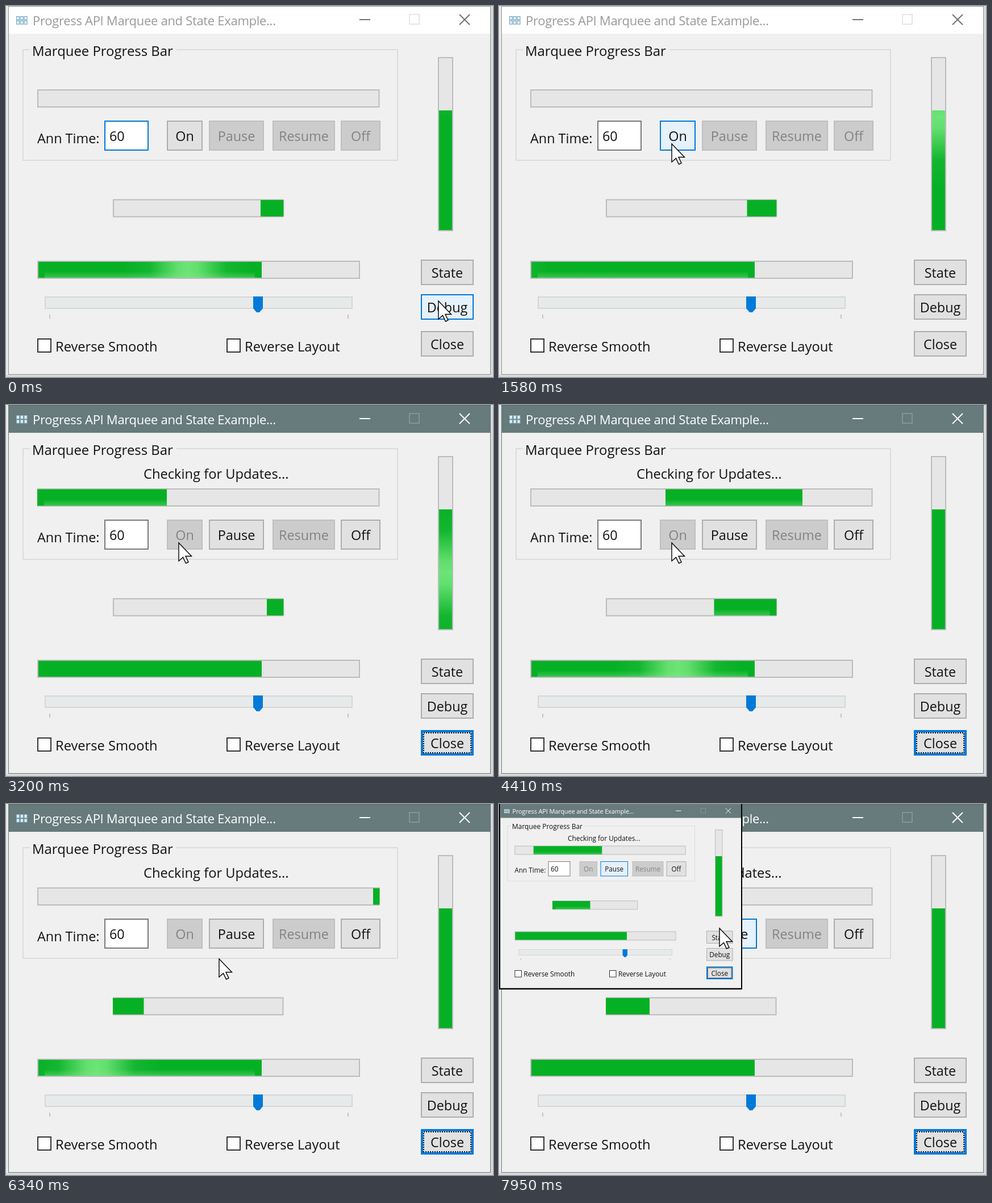
Recreate the animation shown at these times as an HTML page with a canvas. Size 857x654 px, loop 8 s.

```html
<!DOCTYPE html>
<html lang="en">
<head>
<meta charset="utf-8">
<title>Progress bars</title>
<style>
html, body { margin: 0; width: 100%; height: 100%; overflow: hidden; background: #f0f0f0; }
canvas { display: block; }
</style>
</head>
<body>
<canvas id="stage" width="857" height="654"></canvas>
<script>
const ctx = document.getElementById('stage').getContext('2d');
const LOOP = 8000, INSET_AT = 7950, START_AT = 1980, ACTIVE_AT = 1770;
const GREEN = '#06b025', BLUE = '#0078d7', SLATE = '#677a7c';
const CHUNK = 241;

// The screen is sampled unevenly at first, then in runs of nine steps.
const EARLY = [0, 140, 200, 400, 550, 640, 850, 880];
const RUNS = [1110, 1980, 2820, 3670, 4520, 5380, 6230, 7090, 7950];

function snap(t) {
  if (t < RUNS[0]) return EARLY.filter(e => e <= t).pop();
  const i = RUNS.filter(r => r <= t).length - 1;
  if (i === RUNS.length - 1) return RUNS[i];
  const step = (RUNS[i + 1] - RUNS[i] - 120) / 8;
  return RUNS[i] + step * Math.min(8, Math.floor((t - RUNS[i]) / step));
}

// Linear interpolation through [time, value...] keys.
function along(keys, t) {
  let i = 0;
  while (i < keys.length - 2 && t >= keys[i + 1][0]) i++;
  const a = keys[i], b = keys[i + 1];
  const k = Math.max(0, Math.min(1, (t - a[0]) / (b[0] - a[0])));
  return a.slice(1).map((v, j) => v + (b[j + 1] - v) * k);
}

const snapped = keys => keys.map(([t, ...v]) => [snap(t), ...v]);
const TOP = snapped([[1980, -186], [3200, 42], [4410, 293], [5180, 429], [6340, 646], [7950, 965]]);
const MID = snapped([[0, 448], [1580, 978], [3200, 1542], [4410, 2003], [5180, 2282],
  [6340, 2709], [7850, 3273], [7950, 3329]]);
const POINTER = snapped([[0, 761, 520], [400, 761, 520], [640, 728, 493], [880, 590, 400],
  [1490, 304, 243], [5850, 304, 243], [6240, 375, 273], [6430, 375, 273], [6900, 388, 219], [7950, 388, 219]]);

function rect(x, y, r, b, color) {
  ctx.fillStyle = color;
  ctx.fillRect(x, y, r - x, b - y);
}

function box(x, y, r, b, fill, edge, w = 2) {
  rect(x, y, r, b, edge);
  rect(x + w, y + w, r - w, b - w, fill);
}

function text(s, x, y, color = '#111', size = 23.7, align = 'left', spacing = 0) {
  ctx.font = size + 'px "Open Sans", "Noto Sans", sans-serif';
  ctx.letterSpacing = spacing + 'px';
  ctx.textAlign = align;
  ctx.fillStyle = color;
  ctx.fillText(s, x, y);
}

function line(points, color, width) {
  ctx.strokeStyle = color;
  ctx.lineWidth = width;
  ctx.beginPath();
  points.forEach(([x, y]) => ctx.lineTo(x, y));
  ctx.stroke();
}

function button(label, x, y, r, b, { off = false, focus = false, at = [-1, -1] } = {}) {
  const hot = !off && at[0] >= x && at[0] < r && at[1] >= y && at[1] < b;
  const fill = off ? '#cccccc' : hot ? '#e5f1fb' : '#e1e1e1';
  const edge = off ? '#bfbfbf' : hot || focus ? BLUE : '#adadad';
  box(x, y, r, b, fill, edge, focus ? 4 : 2);
  if (focus) {
    ctx.strokeStyle = '#111';
    ctx.lineWidth = 2;
    ctx.setLineDash([2, 2]);
    ctx.strokeRect(x + 5, y + 5, r - x - 10, b - y - 10);
    ctx.setLineDash([]);
  }
  text(label, (x + r) / 2, (y + b) / 2 + 9.5, off ? '#838383' : '#111', 23.4, 'center');
}

// Pale strip along the lower edge of a filled bar.
function sheen(x, r, b) {
  if (r - x < 80) return;
  const g = ctx.createLinearGradient(0, b - 11, 0, b);
  g.addColorStop(0, 'rgba(130,230,140,0)');
  g.addColorStop(1, 'rgba(130,230,140,.4)');
  rect(x, b - 11, r, b, g);
}

function marquee(x, y, r, pos) {
  box(x, y, r, y + 32, '#e6e6e6', '#bcbcbc');
  if (pos === null) return;
  const span = r - x + CHUNK, from = x - CHUNK;
  const left = from + (((pos - from) % span) + span) % span;
  const a = Math.max(x, left), b = Math.min(r, left + CHUNK);
  if (b <= a) return;
  rect(a, y + 1.5, b, y + 30.5, GREEN);
  sheen(Math.max(a, x + 12), Math.min(b, r - 12), y + 30.5);
}

// Signed time from the nearest passing of the glint.
const phase = (t, at, period) => {
  const d = (((t - at) % period) + period) % period;
  return d > period / 2 ? d - period : d;
};

function glint(x0, y0, x1, y1) {
  const g = ctx.createLinearGradient(x0, y0, x1, y1);
  [[0, 0], [.2, .13], [.42, .9], [.5, 1], [.58, .9], [.8, .13], [1, 0]]
    .forEach(([p, a]) => g.addColorStop(p, `rgba(108,228,118,${a})`));
  return g;
}

function levelBars(t) {
  box(55, 449, 623, 481, '#e6e6e6', '#bcbcbc');
  rect(57, 451, 450, 479, GREEN);
  const cx = 320 + .55 * phase(t, 0, 2205);
  if (cx > -55 && cx < 560) {
    rect(57, 451, 450, 479, glint(cx - 112, 0, cx + 112, 0));
    sheen(68, 438, 479);
  }
  box(760, 90, 787, 397, '#e6e6e6', '#bcbcbc');
  rect(762, 184, 785, 395, GREEN);
  const cy = 195 - .52 * phase(t, 1580, 1800);
  rect(762, 184, 785, 395, glint(0, cy - 125, 0, cy + 125));
}

function titleBar(active) {
  rect(5, 0, 852, 49, active ? SLATE : '#fff');
  rect(4, 0, 853, 1, active ? '#566668' : '#8a8a8a');
  for (let i = 0; i < 6; i++) {
    const x = 18 + (i % 3) * 6.8, y = 18 + Math.floor(i / 3) * 7.6;
    box(x, y, x + 6, y + 7, active ? '#d9f0fa' : '#e4f2f8', active ? '#86a8b8' : '#6b9db8', 1);
  }
  text('Progress API Marquee and State Example...', 47, 34, active ? '#fff' : '#999', 22, 'left', -.3);
  const ink = active ? '#fff' : '#727272';
  line([[622, 24], [641, 24]], ink, 2);
  ctx.strokeStyle = active ? '#84968f' : '#e6e6e6';
  ctx.strokeRect(710, 15, 17, 17);
  line([[798, 15], [816, 33]], ink, 2);
  line([[816, 15], [798, 33]], ink, 2);
}

function frameEdges(active) {
  rect(0, 0, 857, 654, '#d9d9d9');
  rect(0, 0, 4, 650, '#eaeaea');
  rect(4, 0, 853, 650, active ? SLATE : '#8f8f8f');
  rect(5, 1, 852, 649, '#f0f0f0');
}

function slider() {
  box(68, 512, 610, 534, '#e7eaea', '#d6d6d6');
  rect(76, 544, 78, 551, '#c4c4c4');
  rect(601, 544, 603, 551, '#c4c4c4');
  ctx.fillStyle = '#007ad9';
  ctx.beginPath();
  [[435, 512], [452, 512], [452, 533], [446, 540], [441, 540], [435, 533]].forEach(p => ctx.lineTo(...p));
  ctx.fill();
}

function drawWindow(t) {
  const active = t >= snap(ACTIVE_AT), on = t >= START_AT;
  const at = along(POINTER, t);
  frameEdges(active);
  titleBar(active);

  ctx.strokeStyle = '#dcdcdc';
  ctx.lineWidth = 2;
  ctx.strokeRect(30, 77, 659, 195);
  rect(42, 74, 300, 80, '#f0f0f0');
  text('Marquee Progress Bar', 46, 87.5, '#111', 23.9);
  if (on) text('Checking for Updates...', 242, 129.5);
  marquee(55, 147, 657.5, on ? along(TOP, t)[0] : null);

  text('Ann Time:', 55, 241.5, '#111', 23.4);
  box(173, 202, 251, 255, '#fff', t < 140 ? BLUE : '#7a7a7a');
  text('60', 182, 238, '#111', 23.4);
  button('On', 283, 202, 346, 255, { off: on, at });
  button('Pause', 357, 202, 454, 255, { off: !on, at });
  button('Resume', 469, 202, 579, 255, { off: true });
  button('Off', 589, 202, 659, 255, { off: !on, at });

  marquee(188, 340.5, 488.5, along(MID, t)[0]);
  levelBars(t);
  slider();

  box(55, 586, 80, 611, '#fff', '#333');
  text('Reverse Smooth', 87, 608.5);
  box(388, 586, 413, 611, '#fff', '#333');
  text('Reverse Layout', 420, 608.5);
  button('State', 730, 447, 823, 492, { at });
  button('Debug', 730, 508, 823, 553, { at });
  button('Close', 730, 573, 823, 618, { focus: on });
}

function pointer(t) {
  const [x, y] = along(POINTER, t);
  ctx.beginPath();
  [[0, 0], [0, 32], [7.5, 25.5], [12.5, 36], [17, 34], [12, 23.5], [22.5, 23.5]]
    .forEach(([px, py]) => ctx.lineTo(x + px, y + py));
  ctx.closePath();
  ctx.fillStyle = '#fff';
  ctx.fill();
  ctx.strokeStyle = '#000';
  ctx.lineWidth = 1.4;
  ctx.stroke();
}

// Half-size copy of the window over a black backing.
function inset(t) {
  rect(0, 0, 428, 327, '#000');
  ctx.save();
  ctx.scale(.5, .5);
  ctx.beginPath();
  ctx.rect(4, 1, 848, 648);
  ctx.clip();
  drawWindow(t);
  ctx.restore();
}

function draw(now) {
  const t = snap(now % LOOP);
  if (t < INSET_AT) drawWindow(t);
  else {
    drawWindow(snap(INSET_AT - 1));
    inset(t);
  }
  pointer(t);
}

function tick() {
  draw(performance.now());
  requestAnimationFrame(tick);
}
tick();
</script>
</body>
</html>
```
